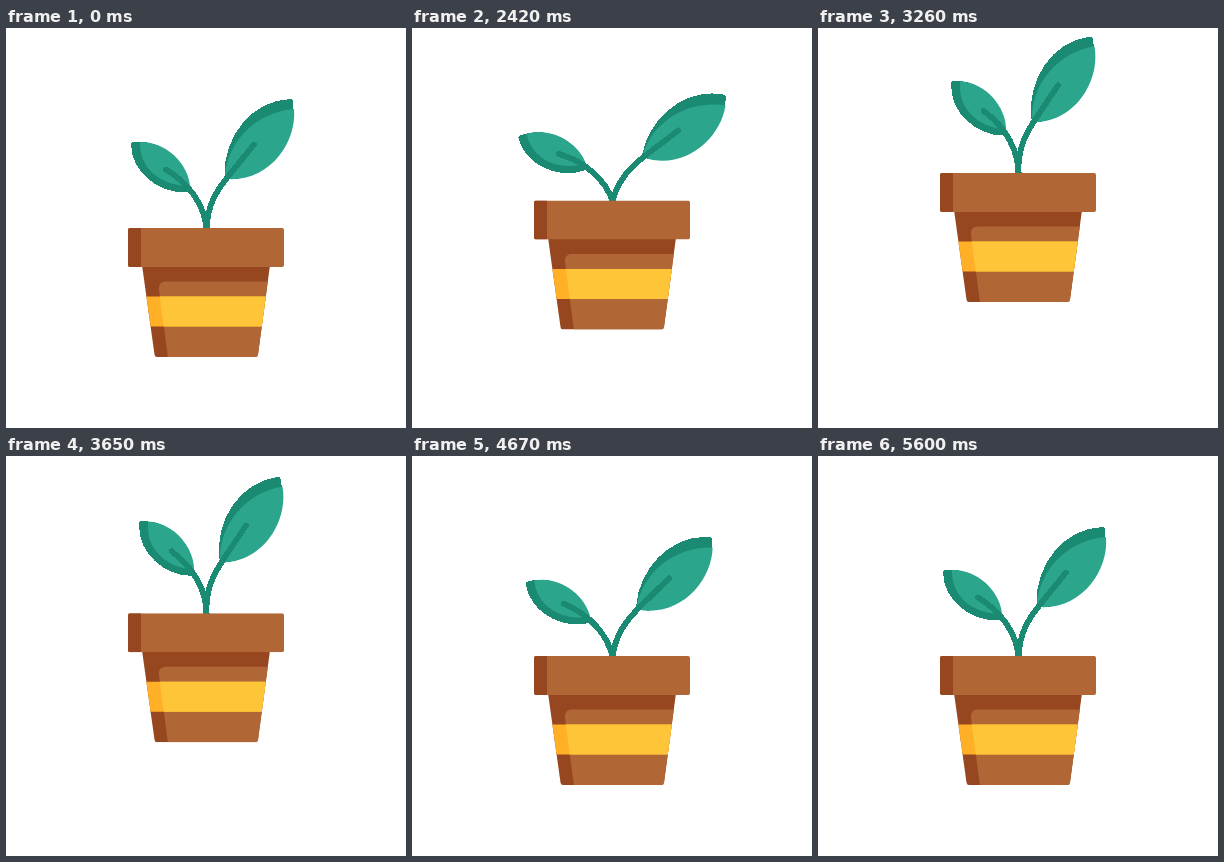
An HTML page that plays this animation: 400 px wide and 400 px high, repeating every 5.66 s.

```html
<!DOCTYPE html>
<html lang="en">
<head>
<meta charset="utf-8">
<title>Jumping plant</title>
<style>
  html, body { margin: 0; height: 100%; overflow: hidden; background: #fff; }
  svg { display: block; width: 100vw; height: 100vh; }
  .stem { fill: none; stroke: #1b8a72; stroke-width: 5.8; stroke-linecap: round; }
  .dark { fill: #1b8a72; }
  .dark, .stem { shape-rendering: crispEdges; }
  .light { fill: #2ca58d; }
  .clay { fill: #b06635; }
  .shade { fill: #96471f; }
</style>
</head>
<body>
<svg viewBox="0 0 400 400">
  <defs>
    <clipPath id="body"><path d="M136 237H264L252 326.500Q251.600 329 249 329H151Q148.900 329 148.500 326.500Z"/></clipPath>
    <clipPath id="rim"><rect x="122" y="200" width="156" height="39" rx="2"/></clipPath>
  </defs>
  <g id="plant">
    <g id="left">
      <path class="dark" d="M128 114Q125 114 125 117C126 148 158 167 182 164Q184 163 184 160C182 134 157 111 128 114Z"/>
      <path class="light" d="M134 114C133 139 153 158 184 158C182 135 159 113 134 114Z"/>
      <path class="stem" d="M160 141.500C184 156 199 178 200.500 202"/>
    </g>
    <g id="right">
      <path class="dark" d="M221 151Q219 151 218.500 148C217 108 247 72 284 71Q287 71 287 74C291 110 264 154 221 151Z"/>
      <path class="light" d="M288 81C251 84 222 112 219 148Q219 151 221 151C264 154 291 114 288 81Z"/>
      <path class="stem" d="M248 116.500L224 146C210 163 201 178 200.500 202"/>
    </g>
    <g clip-path="url(#body)">
      <path class="shade" d="M130 237H270V330H130Z"/>
      <path class="clay" d="M270 253.500H160Q152 253.500 153 262L162 330H270Z"/>
      <path fill="#ffb027" d="M130 268.500H270V298.500H130Z"/>
      <path fill="#ffc539" d="M153.800 268.500H270V298.500H157.800Z"/>
    </g>
    <g clip-path="url(#rim)">
      <path class="clay" d="M122 200H278V239H122Z"/>
      <path class="shade" d="M122 200H135V239H122Z"/>
    </g>
  </g>
</svg>
<script>
const LOOP = 5660;
const HEIGHT = 55;
const REBOUND = 5.4; // degrees a leaf swings up past its rest angle
const [plant, left, right] = ['plant', 'left', 'right'].map(id => document.getElementById(id));

// Smooth step from 0 to 1 between two times in ms.
function ease(t, start, end) {
  const u = Math.min(1, Math.max(0, (t - start) / (end - start)));
  return u * u * (3 - 2 * u);
}

const lift = t => HEIGHT * (ease(t, 2000, 2840) - ease(t, 3400, 4220));

// Leaves sag at take-off and at landing, and rebound after each.
const droop = (t, takeOff, landing) =>
  takeOff * ease(t, 2000, 2470) - (takeOff + REBOUND) * ease(t, 2470, 3220)
  + (landing + REBOUND) * (ease(t, 3680, 4390) - ease(t, 4390, 5090))
  + REBOUND * ease(t, 5090, 5600);

const turn = (leaf, angle) => leaf.setAttribute('transform', `rotate(${angle} 200 200)`);

function draw() {
  const t = performance.now() % LOOP;
  plant.setAttribute('transform', `translate(0 ${-lift(t)})`);
  turn(left, -droop(t, 15, 15.8));
  turn(right, droop(t, 14, 12.8));
  requestAnimationFrame(draw);
}
draw();
</script>
</body>
</html>
```
